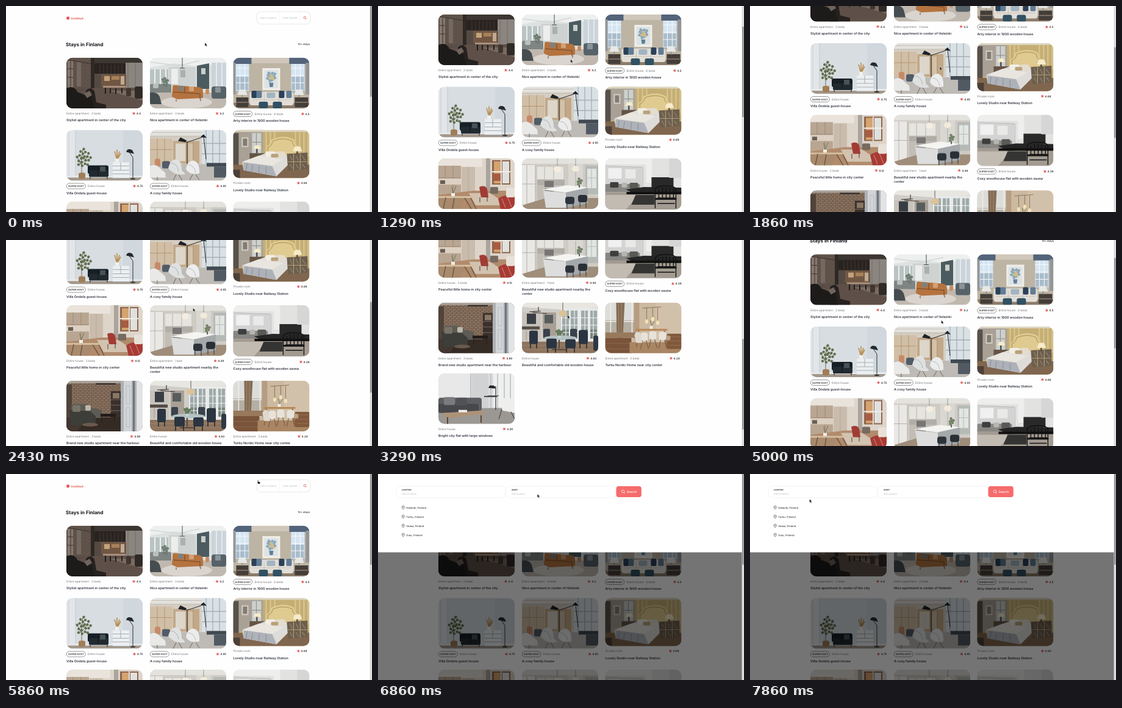
Recreate the animation shown at these times as an HTML page. Size 600x338 px, loop 8 s.

```html
<!DOCTYPE html>
<html lang="en">
<head>
<meta charset="utf-8">
<title>Stays</title>
<style>
html, body { margin: 0; width: 100%; height: 100%; overflow: hidden; background: #fefefe; }
svg { display: block; width: 100%; height: 100%; font-family: Inter, "Open Sans", sans-serif; text-rendering: geometricPrecision; }
</style>
</head>
<body>
<svg id="stage" viewBox="0 0 600 338"></svg>
<script>
const R = (x, y, w, h, c, r = 0, more = '') =>
  `<rect x="${x}" y="${y}" width="${w}" height="${h}" rx="${r}" fill="${c}" ${more}/>`;
const E = (x, y, rx, ry, c) => `<ellipse cx="${x}" cy="${y}" rx="${rx}" ry="${ry}" fill="${c}"/>`;
const P = (d, c) => `<path d="${d}" fill="${c}"/>`;
const L = (d, c, w = 1) => `<path d="${d}" fill="none" stroke="${c}" stroke-width="${w}"/>`;
const T = (x, y, s, size, c, weight = 400, anchor = 'start') =>
  `<text x="${x}" y="${y}" font-size="${size}" fill="${c}" font-weight="${weight}" text-anchor="${anchor}">${s}</text>`;
const at = (x, y, s) => `<g transform="translate(${x} ${y})">${s}</g>`;

const RED = '#eb5757';
const starPath = 'M' + [...Array(10)].map((_, i) => {
  const a = i * Math.PI / 5, r = i % 2 ? 1.3 : 2.9;
  return `${(r * Math.sin(a)).toFixed(2)} ${(-r * Math.cos(a)).toFixed(2)}`;
}).join('L') + 'z';
const lens = (x, y, r, c, w) =>
  `<circle cx="${x}" cy="${y}" r="${r}" fill="none" stroke="${c}" stroke-width="${w}"/>` +
  L(`M${x + r * .7} ${y + r * .7}l${r * .8} ${r * .8}`, c, w);
const bricks = (w, h, c) => [...Array(Math.floor(h / 3))].map((_, i) =>
  `<path d="M${i % 2 * 3} ${i * 3 + 2}H${w}" stroke="${c}" stroke-width="1.4" stroke-dasharray="5 2"/>`).join('');
const leaves = (x, y, w, h, n, c) => [...Array(n)].map((_, i) =>
  E(x + w * Math.sin(i * 2.4) * Math.sqrt(i / n), y + h * Math.cos(i * 2.4) * Math.sqrt(i / n), 2.2, 2.2, c)).join('');

// Room scenes, drawn in a 125 x 83 box
const rooms = {
  loft: () => R(0, 0, 125, 83, '#544a43') + R(0, 0, 42, 52, '#5b4f47') + bricks(40, 50, '#66584e') + R(2, 5, 9, 44, '#85796f') +
    R(17, 7, 7, 40, '#746860') + L('M7 5v42M2 18h9M2 32h9M0 3l55 9', '#3b332f') + R(40, 0, 6, 50, '#2f2926') +
    R(46, 0, 79, 9, '#3c3632') + R(97, 8, 28, 44, '#8b8580') + L('M101 8v44m12-44v44', '#726b66') + R(46, 9, 51, 17, '#29231f') +
    L('M55 11v15m6-15v15m6-15v15m6-15v15m6-15v15m6-15v15m6-15v15', '#4e4541', .7) +
    R(57, 27, 41, 20, '#715743') + R(62, 30, 9, 8, '#c4a27b') + R(74, 30, 13, 6, '#a88159') + R(89, 30, 6, 14, '#c0aa92') +
    P('M0 83V58l50-9h75v34z', '#5e5048') + P('M70 54h55v16z', '#7b6b5f') +
    R(60, 46, 37, 3, '#a98f7c') + L('M64 49v10m8-9v8m9-8v9m10-9v8', '#211d1b', 2) +
    P('M32 83V54q8-8 14 1l3 18 16 4v6z', '#25211f') + P('M0 83V50q12-6 18 6l23 9 5 18z', '#1d1b1a') +
    P('M29 59l9-5 4 7-8 5z', '#6f655d') + R(112, 47, 13, 20, '#302a27', 3) + R(98, 50, 8, 13, '#3f3631', 2),
  living: () => R(0, 0, 125, 83, '#dde1e1') + P('M0 0h125v8L80 14 40 9 0 16z', '#eef0ef') + L('M0 7l46 6 35-8', '#d2d6d5', 1.5) +
    R(0, 19, 30, 28, '#b9c3c2') + L('M8 19v28m9-28v28m9-28v28', '#eff1f0', 2) + R(31, 15, 44, 31, '#ced2d0') +
    R(35, 18, 11, 25, '#eceeec') + R(50, 20, 8, 12, '#a9b1b0') + P('M77 13l20-4v42H77z', '#4b5b60') + R(84, 17, 7, 10, '#c9cec9') +
    R(101, 8, 24, 40, '#cbd4da') + L('M109 8v40m9-40v40', '#eef1f2', 1.5) + R(0, 43, 35, 16, '#7e8583', 3) + R(5, 42, 9, 8, '#b9bfbd', 2) +
    P('M0 57h125v26H0z', '#c0b8af') + E(60, 73, 42, 10, '#d9d4ce') +
    P('M37 48q0-4 5-3l38 3q7 1 7 8v10l-42 2-9-4z', '#b4733f') + L('M38 56l44 3v9M57 48v10M43 68v4m40-5v4', '#754526') +
    R(47, 46, 7, 8, '#73838b', 1) + R(64, 47, 8, 8, '#d2a077', 1) + R(101, 47, 24, 20, '#566268', 4) + R(107, 48, 9, 9, '#89949a', 1) +
    R(91, 51, 6, 9, '#c98c5d', 3) + P('M0 57q12-2 16 7l3 12H0z', '#454d51') +
    L('M53 0v16m-4 1h8', '#454b4a', 1) + leaves(25, 39, 5, 8, 9, '#6e7c70'),
  arty: () => R(0, 0, 125, 83, '#bdb4a4') + R(30, 0, 62, 9, '#cfc7b9') + R(4, 6, 22, 48, '#d5e5f2') + R(95, 6, 22, 48, '#d5e5f2') +
    R(5, 31, 20, 22, '#a9bccb') + R(96, 31, 20, 22, '#a9bccb') +
    L('M4 17h22M4 29h22M4 41h22M11 6v48M19 6v48M95 17h22M95 29h22M95 41h22M102 6v48M110 6v48', '#f8f9fa', 1) +
    R(0, 0, 30, 10, '#53637a') + R(92, 0, 33, 10, '#53637a') + R(0, 8, 4, 52, '#92969a') + R(119, 8, 6, 52, '#92969a') +
    R(48, 17, 29, 36, '#f1eee8') + R(51, 20, 23, 30, '#dde3e4') + leaves(62, 31, 8, 8, 15, '#87a6bb') + leaves(63, 33, 5, 5, 5, '#d2bd88') +
    P('M59 41h7l-1 7h-5z', '#637f98') + R(0, 74, 125, 9, '#8c7c6a') + R(27, 56, 72, 22, '#e2ded7', 4) + L('M31 69h64M51 60v14m24-14v14', '#c3beb5', .8) +
    [30, 38, 75, 87].map((x, i) => R(x, 54, 9, 12, i % 2 ? '#617d95' : '#2b4059', 2)).join('') + R(55, 57, 14, 9, '#a3b4c2', 2) +
    P('M10 52h10l3 9H7zM103 52h10l3 9h-16z', '#e6e8e8') + R(5, 65, 20, 16, '#443e3a') + R(101, 65, 22, 16, '#443e3a') +
    L('M15 61v5m93-5v5M6 73h18m78 0h20', '#8e8070', 1.3) + R(42, 72, 15, 11, '#315163', 3) + R(65, 72, 15, 11, '#315163', 3),
  villa: () => R(0, 0, 125, 83, '#d0d7dd') + R(8, 0, 85, 76, '#d7dde1') + R(0, 0, 15, 78, '#e3e6e9') + L('M15 0v77M4 0v77', '#c1c9cf') +
    R(0, 75, 125, 3, '#e7eaec') + R(0, 78, 125, 5, '#a3978b') + L('M25 77V43m0 16l-7-14m7 11l11-15m-11 8l2-17', '#75684f', 1) +
    leaves(28, 46, 12, 16, 20, '#626e4e') + R(20, 70, 11, 10, '#a07d55', 3) + R(35, 58, 34, 14, '#171f26', 3) +
    R(37, 66, 32, 11, '#222a31', 2) + L('M52 60v15M39 77v3m28-3v3', '#0f151a') + R(55, 60, 9, 8, '#465357', 1) +
    R(76, 53, 27, 26, '#eceff1') + L('M76 59h27m-27 7h27m-27 6h27M89 53v13M77 79h25', '#9da5aa', .9) +
    L('M83 49l-4-14m4 14V32m0 17l4-14m-4 14l6-11', '#b98f53', 1.6) + R(80, 47, 6, 6, '#f4f0e9') +
    L('M109 79V45l-7-10', '#292e31', 1) + P('M98 36q2-7 10-3l3 6z', '#25292c') + E(109, 80, 4, 1, '#292e31'),
  family: () => R(0, 0, 125, 83, '#d5cec3') + R(0, 0, 125, 9, '#e3e2de') + L('M0 4h85M0 11h85', '#c4bfb6') + R(0, 14, 37, 43, '#d1bea6') +
    R(38, 18, 43, 37, '#c2a888') + R(42, 22, 16, 29, '#ddd6cb') + R(63, 22, 7, 29, '#d3c2ab') +
    L('M12 14v43m12-43v43m37-39v37m10-37v37M0 32h37', '#b39673') +
    R(85, 0, 40, 56, '#d9e1e5') + L('M92 0v56m11-56v56m11-56v56M85 22h40M85 39h40', '#a6b0b5', 1.3) + R(0, 56, 125, 27, '#bebab5') +
    R(93, 54, 32, 6, '#414951') + R(105, 60, 20, 18, '#515a63') + R(8, 47, 9, 13, '#c68a68', 3) + R(20, 51, 13, 12, '#525c67', 3) +
    P('M0 59q9-5 17 4l8 7 1 8H0z', '#e9e9e8') + P('M30 63q3-15 14-15 8 2 8 18l6 6q-15 5-28-9z', '#dfe1e1') + L('M35 54q10 1 12 14', '#aeb3b6') +
    P('M59 64q2-14 12-14 11 2 10 21-16 4-22-7z', '#ebeceb') + L('M63 57q10 1 12 13', '#b7bbbd') +
    L('M43 73l-5 10m9-10l6 10m17-10l-5 9m10-9l6 9M12 77v6', '#665c53', .9) +
    L('M61 56V20l27-9 4 37M61 20L49 16', '#1f242a', 1) + P('M46 18l4-6 10 5-2 3zM83 11l5-4 5 6z', '#1c2228'),
  studio: () => R(0, 0, 125, 83, '#c5ae74') + R(0, 0, 49, 55, '#a9a196') + R(0, 0, 125, 3, '#ddd5c2') + R(31, 5, 15, 35, '#ccd0ce') + L('M38 5v35M31 20h15', '#8e877c') +
    R(0, 5, 9, 55, '#57504c') + R(14, 12, 11, 16, '#d5cec0') + R(16, 14, 7, 12, '#807c77') +
    bricks(0, 0, '#fff') + L('M54 3v40m7-40v40m7-40v40m34-40v40m7-40v40m7-40v40m7-40v40', '#d9c793', 2) +
    P('M55 42V26q5 0 7-10 22-10 38 0 1 10 7 10v24z', '#dfca90') + L('M57 42V28q6-1 8-10 18-7 32 0 1 9 7 10v20', '#a98d51', 1) +
    P('M0 57h125v26H0z', '#80664f') + R(27, 38, 25, 14, '#655446') +
    P('M48 40q19-9 42 1v16L71 76 17 66l-2-13z', '#dedcd9') + P('M17 53l47 6 7 17-54-10z', '#aeb2b8') +
    P('M15 52l27-10 40 6-18 11z', '#e9e5df') + L('M23 55l-2 12m11-10l-2 12m13-11l-1 12m12-10v12', '#858d99', 1) +
    R(53, 35, 16, 9, '#f2eee5', 3) + R(70, 35, 15, 10, '#e4dccd', 3) + R(62, 39, 12, 6, '#b9a27a', 2) +
    P('M88 39l34-2v27l-32 3z', '#6d5f4e') + L('M99 38v28m11-28v27M90 52h31', '#b5a17b', 1.1) + L('M93 42l4 8m6-8l4 8m6-8l5 8M93 56l4 7m6-7l4 7m6-7l5 6', '#93866f', 1.2) +
    P('M101 27h9l3 8H98zM36 25h7l3 6H33z', '#f7ebca') + L('M105 35v4M39 31v7', '#453d38', 2) + R(0, 65, 11, 14, '#4c4038'),
  peaceful: () => R(0, 0, 125, 83, '#ded5ca') + R(0, 0, 72, 14, '#e9e3db') + R(0, 12, 37, 48, '#b9a692') +
    L('M11 12v20m13-20v48M0 32h37', '#9c8874') + R(0, 33, 37, 10, '#dcd0c2') + R(3, 36, 8, 6, '#695e54') + R(38, 14, 22, 43, '#cabcac') + L('M49 14v43', '#b7a795') +
    R(78, 0, 7, 56, '#aaa49c') + R(88, 3, 30, 40, '#8f654e') + R(91, 5, 11, 36, '#d4a46f') + R(105, 5, 11, 36, '#dfe1df') + R(91, 25, 11, 12, '#a85c43') +
    L('M88 22h30M103 3v40', '#f0ede8', 1.8) + P('M0 60l57-7h68v30H0z', '#b18b6c') + P('M50 57h35l30 20H61z', '#d2c2b0') +
    P('M67 47q9-4 13 3l2 14H70z', '#a13c35') + P('M98 66q12-9 27-2v19h-23z', '#a73a34') + L('M104 66l6 15m3-18l7 17', '#d88f80', 1) +
    R(111, 48, 14, 16, '#e8e1d9', 3) + R(85, 47, 13, 11, '#776a5f', 2) + R(0, 62, 58, 3, '#d5bfa1') + P('M0 65h44L35 83H0z', '#a98a6d') +
    L('M12 64L8 83m35-18l11 18M53 65l9 18M26 65l-3 18', '#6d5845', 1.5) + L('M24 58l-2-12m2 12l5-13', '#6b7256') + R(21, 57, 6, 5, '#f2eee8') +
    L('M68 64v8m12-9v8', '#4d3831'),
  kitchen: () => R(0, 0, 125, 83, '#cfcbc4') + R(0, 0, 125, 9, '#e4e2dd') + R(0, 11, 22, 66, '#e9e8e5') + L('M8 11v66m14-66v66M0 42h22', '#b3b0a9') +
    R(25, 14, 43, 20, '#e6e4df') + L('M37 14v20m15-20v20', '#b5b2ab') + R(25, 35, 45, 9, '#b1aea7') + R(25, 44, 43, 25, '#c2beb6') +
    R(37, 37, 15, 10, '#777674') + R(37, 49, 15, 17, '#8e8d8a') + R(76, 9, 24, 39, '#d9d7d1') + L('M88 9v39', '#aca9a2') +
    R(104, 12, 21, 47, '#b6bab6') + R(107, 17, 15, 32, '#e2e6e3') + L('M114 17v32M107 32h15', '#b4bab7') +
    P('M0 77l40-12h85v18H0z', '#9f8d7a') + P('M33 51l42-7 35 4-38 8z', '#f4f4f2') + P('M35 53l37 4v24H39z', '#dcdddc') +
    P('M72 56l36-8v26l-36 7z', '#a4a8aa') + R(71, 63, 15, 12, '#2d333a', 4) + R(92, 60, 15, 12, '#292f35', 4) +
    L('M74 74v9m10-9v9m11-11v9m10-9v9', '#30363b') + L('M58 0v14M88 0v13', '#82807c', .7) + E(58, 18, 6, 5, '#f5eee0') + E(88, 17, 6, 5, '#f2eadb') +
    L('M94 48v-5', '#5d655c', 2) + leaves(94, 38, 4, 6, 7, '#74836a'),
  wood: () => R(0, 0, 125, 84, '#e2e2e1') + R(0, 0, 76, 10, '#eeeeed') + R(0, 13, 61, 35, '#d2d3d2') +
    R(5, 16, 22, 17, '#eff0ef') + R(33, 18, 17, 15, '#e9e9e8') + L('M0 12l62 3v33', '#bbbcbb') + R(67, 0, 10, 40, '#eeeeed') + R(76, 31, 36, 17, '#292929') +
    R(105, 0, 20, 32, '#d5d6d5') + R(0, 51, 125, 33, '#a39b91') + L('M0 55h44M0 66h70M0 75h80', '#b5ada3') +
    R(0, 42, 57, 13, '#888784', 2) + R(8, 39, 14, 9, '#3d3e3e', 2) + R(27, 40, 9, 8, '#b7b5b0', 2) + R(40, 40, 14, 10, '#595956', 2) +
    P('M0 60h54l-20 24H0z', '#c2bbb2') + P('M34 51l30-4 61 1v9l-75 2z', '#252525') + R(35, 55, 90, 4, '#111') + P('M50 60h31v16H43z', '#343433') +
    L('M82 82V52q0-7 17-7t17 7v30M86 65h29M88 51v14m6-17v17m6-18v18m6-17v17m6-15v15M86 74h28', '#111', 1.4) + R(82, 65, 35, 3, '#171717'),
  brick: () => R(0, 0, 125, 83, '#735e4f') + bricks(92, 61, '#937a66') + R(0, 0, 94, 4, '#a9a199') +
    R(0, 6, 9, 54, '#514339') + R(48, 4, 33, 2, '#2e2927') + R(73, 17, 17, 44, '#3a302b') + R(76, 20, 11, 9, '#887666') +
    L('M73 31h17m-17 9h17m-17 9h17', '#77665a') + P('M0 60h92v23H0z', '#352b25') + P('M0 60h35L18 83H0z', '#423630') +
    P('M8 42q0-4 5-4h18q4 0 5 5l22 5v13H8z', '#5c5b55') + P('M5 48l34 2 9 8v15H8z', '#3d3d39') + R(10, 40, 13, 11, '#777368', 2) +
    R(31, 40, 9, 9, '#bdb6aa', 2) + R(56, 54, 25, 5, '#211d1a') + L('M58 59v9m21-9v9', '#211d1a') + E(39, 72, 13, 3, '#6b5a4c') +
    R(89, 0, 36, 83, '#adb0b6') + R(94, 0, 13, 83, '#d2d4d7') + R(109, 0, 3, 83, '#6d7379') + R(115, 0, 10, 83, '#e2e3e5') + L('M98 8h6v30h-6zm0 36h6v32h-6z', '#aeb3b8', .7),
  dining: () => R(0, 0, 125, 83, '#cfcdc7') + P('M0 0h125v8L72 12 0 7z', '#e8e6e1') + R(0, 16, 31, 46, '#c7c2ba') +
    R(8, 18, 15, 17, '#383e44') + R(0, 39, 29, 5, '#544d47') + L('M7 44v18m9-18v18m9-18v18', '#a69f95') + R(34, 16, 22, 41, '#a99f95') + R(37, 20, 14, 14, '#565d5e') +
    R(64, 9, 61, 57, '#e8eae9') + [66, 80, 97, 112].map(x => R(x, 13, 11, 46, '#9eaaa9') + R(x, 44, 11, 15, '#78857f')).join('') +
    L('M64 25h61M64 37h61M64 49h61M72 12v50m14-50v50m17-50v50m14-50v50', '#eff1ef', 1.2) + R(0, 64, 125, 19, '#8d735d') + L('M0 70h125M0 77h125', '#9d846e') +
    L('M12 15l19-1m-4-7v8m-10 1l24 2', '#433d38', 1.2) + L('M67 0v14', '#625d54') + E(67, 18, 7, 5, '#dcc297') +
    R(35, 43, 11, 16, '#39424d', 2) + R(79, 43, 11, 16, '#39424d', 2) + E(63, 58, 27, 4, '#b4c1c2') + L('M61 61v14m-12 2h25', '#554b42', 2) +
    leaves(61, 49, 5, 5, 9, '#667b5e') + R(59, 54, 5, 4, '#c9d2ce') +
    [[12, 46, 14, 22], [40, 59, 17, 16], [93, 45, 15, 23], [71, 60, 17, 15]]
      .map(([x, y, w, h]) => R(x, y, w, h, '#2b3542', 3) + L(`M${x + 2} ${y + h - 1}v8m${w - 4}-8v8`, '#262b31', 1.6)).join('') + R(117, 54, 8, 25, '#303943', 3),
  nordic: () => R(0, 0, 125, 83, '#cbb9a1') + R(83, 0, 42, 65, '#d2c1aa') + R(0, 0, 48, 59, '#dcddd9') + R(0, 29, 48, 22, '#b5afa4') + L('M9 0v58M44 0v58M0 31h48', '#f0eeea', 1.5) +
    P('M18 0h14l-3 58H19z', '#846c55') + L('M22 0v58M27 0l-1 58', '#a1886d') + R(47, 0, 9, 60, '#b69d82') + R(0, 49, 50, 9, '#98795c') + R(0, 58, 43, 25, '#79533a') +
    L('M0 67h43M0 76h43', '#906a4b') + P('M40 65h85v18H40z', '#a98564') + R(101, 51, 24, 25, '#80593c', 2) + L('M104 56h20m-20 7h20m-20 7h20', '#996e4c') + R(90, 54, 17, 8, '#ba9f80', 3) +
    L('M61 9l31-2M68 8v20M78 8v16m8-16v22', '#846343', .8) + [[68, 31], [78, 27], [86, 33]].map(([x, y]) => E(x, y, 2.5, 3.5, '#f5e2b5')).join('') +
    R(50, 43, 52, 3, '#b98857') + L('M55 46l-4 27m46-27l4 27', '#94663f', 1.8) +
    [[58, 49], [72, 47], [88, 48]].map(([x, y]) => R(x, y, 12, 14, '#e8e3da', 4) + L(`M${x + 3} ${y + 13}l-3 14m9-14l4 14`, '#73573f')).join('') +
    P('M48 54q2-9 9-5l4 17H51z', '#ded8cd') + R(73, 38, 5, 5, '#f0e9dd') + L('M76 38l-2-9m2 9l5-8', '#77745c'),
  lounge: () => R(0, 0, 125, 83, '#dcdddf') + R(0, 0, 52, 50, '#e8e8e9') + R(55, 0, 27, 58, '#d1d2d4') + R(90, 0, 35, 56, '#eeefef') +
    L('M53 0v52m33-52v57m11-57v57m11-57v57m10-57v57', '#bdbfc1', 1.6) + R(0, 57, 125, 26, '#9b9792') +
    R(0, 40, 71, 22, '#5d5e61', 4) + R(0, 50, 66, 15, '#46484b', 3) + R(9, 39, 18, 13, '#7a7b7e', 2) + R(29, 40, 18, 13, '#505255', 2) +
    L('M94 60V22l-10 1m-3 14h18', '#333', 1.2) + P('M82 24l2-4h7l3 5z', '#242424') + R(75, 37, 21, 2, '#434343') +
    P('M100 44q14-8 25 0v21l-20-4z', '#eeeeec') + L('M104 59l-5 16m20-12l6 12', '#36322f') +
    P('M8 65l62-4 7 5-63 8z', '#ad9276') + L('M15 72v11m55-14v12', '#574638', 2) + R(33, 60, 14, 4, '#f0ede8')
};

const APT = 'Entire apartment', HOUSE = 'Entire house';
const cols = [99, 236, 372.4], rows = [85, 203.5, 321, 445, 561];
// scene, super host, kind, rating, star offset, title lines
const stays = [
  ['loft', 0, APT + ' . 2 beds', '4.4', 110.5, 'Stylist apartment in center of the city'],
  ['living', 0, APT + ' . 3 beds', '4.2', 110, 'Nice apartment in center of Helsinki'],
  ['arty', 1, HOUSE + ' . 6 beds', '4.5', 114, 'Arty interior in 1900 wooden house'],
  ['villa', 1, HOUSE, '4.75', 111.5, 'Villa Ondela guest-house'],
  ['family', 1, HOUSE, '4.95', 111, 'A cosy family house'],
  ['studio', 0, 'Private room', '4.68', 107, 'Lovely Studio near Railway Station'],
  ['peaceful', 0, HOUSE + ' . 3 beds', '4.12', 108, 'Peaceful little home in city center'],
  ['kitchen', 0, APT + ' . 1 bed', '4.49', 107, 'Beautiful new studio apartment nearby the|center'],
  ['wood', 1, HOUSE, '4.38', 111, 'Cozy woodhouse flat with wooden sauna'],
  ['brick', 0, APT + ' . 3 beds', '4.89', 107, 'Brand new studio apartment near the harbour'],
  ['dining', 0, HOUSE, '4.63', 108, 'Beautiful and comfortable old wooden house'],
  ['nordic', 0, APT + ' . 3 beds', '4.24', 108, 'Turku Nordic Home near city center'],
  ['lounge', 0, HOUSE, '4.56', 108, 'Bright city flat with large windows']
];

function card([scene, host, kind, rating, starX, title], i) {
  const h = scene === 'studio' ? 78.7 : scene === 'wood' ? 84 : 83;
  const mid = h + (host ? 9 : 8.3);
  const badge = R(.3, mid - 4.5, 31, 9, '#fefefe', 4.5, 'stroke="#555" stroke-width=".6"') +
    T(15.8, mid + 1.5, 'SUPER HOST', 4.05, '#4f4f4f', 700, 'middle');
  const lines = title.split('|').map((s, n) => T(0, mid + 13.1 + n * 7, s, 5.45, '#333842', 640)).join('');
  return at(cols[i % 3], rows[i / 3 | 0],
    `<clipPath id="clip${i}">${R(0, 0, 125, h, '#000', 10)}</clipPath><g clip-path="url(#clip${i})">${rooms[scene]()}</g>` +
    (host ? badge : '') + T(host ? 35 : 0, mid + 1.7, kind, 4.73, '#757575') +
    at(starX, mid, P(starPath, RED)) + T(starX + 4.2, mid + 1.7, rating, 4.55, '#333', 620) + lines);
}

const header = E(101.6, 19.8, 2.6, 2.6, RED) + T(106.5, 21.9, 'nookbud', 4.7, RED, 700) +
  R(411.5, 10, 86.5, 19, '#fff', 6, 'style="filter:drop-shadow(0 .6px 1.2px #0003)"') +
  T(416.5, 21.1, 'Add Location', 4.3, '#bdbdbd') + T(454, 21.1, 'Add Guests', 4.3, '#bdbdbd') +
  L('M448.5 10v19m33-19v19', '#f2f2f2', .6) + lens(489.8, 19, 1.8, RED, .8) +
  T(98, 65.5, 'Stays in Finland', 8, '#15171c', 700) + T(498, 64.2, '12+ stays', 4.25, '#3c3c3c', 580, 'end');

const box = (x, w) => R(x, 20, w, 19, '#fff', 7, 'stroke="#ececec" stroke-width=".6"');
const places = ['Helsinki', 'Turku', 'Vaasa', 'Oulu'].map((name, i) => at(41.3, 55.3 + i * 15,
  L('M0 2.7Q-2.2.3-2.2-.8a2.2 2.2 0 0 1 4.4 0Q2.2.3 0 2.7z', '#4f4f4f', .7) + E(0, -.8, .8, .8, '#4f4f4f') +
  T(5, 1.6, name + ', Finland', 4.2, '#3a3a3a', 500))).join('');
const panel = R(0, 0, 597, 128.5, '#fff') + box(30, 179) + box(209, 181) +
  T(39, 26.7, 'LOCATION', 3, '#333', 800) + T(39, 33.7, 'Add location', 4.1, '#bdbdbd') +
  T(219, 26.7, 'GUEST', 3, '#333', 800) + T(219, 33.7, 'Add guests', 4.1, '#bdbdbd') +
  R(390.5, 20, 41.3, 18, '#f66b6b', 4) + lens(401.6, 28.6, 2.3, '#fff', .8) + T(407.5, 31, 'Search', 5.1, '#fff', 500) + places;

const stage = document.getElementById('stage');
stage.innerHTML = R(0, 0, 600, 338, '#fefefe') + `<g id="page">${header}${stays.map(card).join('')}</g>` +
  R(0, 0, 597, 338, '#000', 0, 'id="shade"') + `<g id="panel">${panel}</g>` +
  R(596.5, 0, 3.5, 338, '#dcdcdc') + R(597, 0, 2.6, 149, '#929292', 1.3, 'id="thumb"') +
  '<path id="cursor" stroke="#fff" stroke-width=".45" fill="#111"/>';
const [page, shade, sheet, thumb, cursor] = ['page', 'shade', 'panel', 'thumb', 'cursor'].map(id => document.getElementById(id));

const ARROW = 'M0 0v6l1.4-1.2 1 2.2 1-.4-1-2.2h1.9z';
const HAND = 'M1 0c.6 0 .8.4.8 1v1.6l2.2.5c.6.2.8.6.7 1.2l-.4 2h-2.8L-.2 4.1c-.3-.5.2-.8.6-.5l.3.2V.9C.2.4.5 0 1 0z';

// Tracks: [tick, value], at 7 ticks per second
const scrollKeys = [[0, 0], [4, 18], [9, 71], [17, 214], [25, 385], [27, 385], [28, 345], [29, 297.5], [35, 61.5], [37, 0]];
const xKeys = [[0, 326], [17, 306.5], [29, 315], [35, 313.5], [37, 314], [41, 412], [43, 428], [45, 428], [50, 150], [53, 104], [55, 97.5]];
const yKeys = [[0, 60], [17, 111.5], [29, 135], [35, 131.5], [37, 128], [41, 10], [43, 19], [45, 19], [50, 42], [53, 43], [55, 41]];
const openKeys = [[45, 0], [46, .6], [47, .9], [48, 1]];

function track(keys, t) {
  const i = keys.findIndex(k => k[0] > t);
  if (i < 0) return keys[keys.length - 1][1];
  const [a, u] = keys[Math.max(i - 1, 0)], [b, v] = keys[i];
  return t <= a ? u : u + (v - u) * (t - a) / (b - a);
}
const move = (el, x, y) => el.setAttribute('transform', `translate(${x} ${y})`);

function draw(ms) {
  const tick = Math.min(55, Math.floor((ms % 8000 + 6) * 7 / 1000));
  const scroll = track(scrollKeys, tick), open = track(openKeys, tick);
  move(page, 0, -scroll);
  move(thumb, 0, scroll * .474);
  move(sheet, 0, (open - 1) * 129);
  shade.setAttribute('opacity', open * .54);
  move(cursor, track(xKeys, tick), track(yKeys, tick));
  cursor.setAttribute('d', tick > 40 && tick < 46 ? HAND : ARROW);
}

const start = performance.now();
function loop() {
  draw(performance.now() - start);
  requestAnimationFrame(loop);
}
loop();
</script>
</body>
</html>
```
